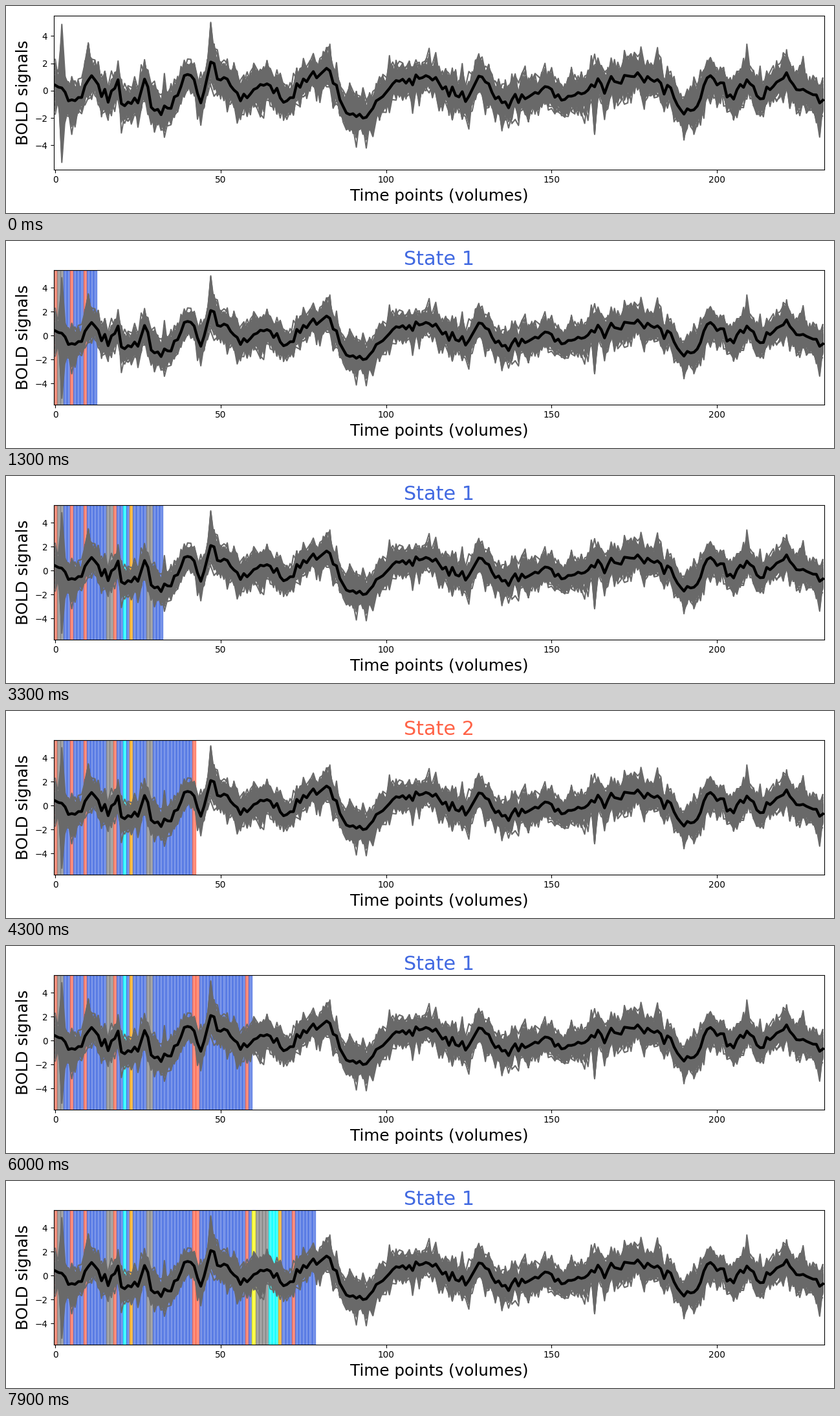
A matplotlib script for the animation above (8000 ms loop, 1280 by 320 pixels).

```python
import numpy as np
import matplotlib.pyplot as plt
from matplotlib.animation import FuncAnimation
from matplotlib.collections import LineCollection

W, H, DPI = 1280, 320, 100
POINTS, REGIONS, STEPS = 233, 150, 80
LEFT, RIGHT, BOTTOM = 74, 1265, 252.5
TOP_PLAIN, TOP_TITLED = 14.5, 44.5

plt.rcParams["font.family"] = "DejaVu Sans"
rng = np.random.default_rng(4)
t = np.arange(POINTS)

# Main swings of the mean signal: (volume, value).
SWINGS = [
    (0, .4), (2, .2), (4, -.75), (7, -.5), (11, 1.1), (16, -.85), (19, .8),
    (20, -.95), (25, -.9), (27, .85), (30, -1.45), (35, -1.3), (39, 1.1),
    (42, .8), (44, -.9), (47, 2.1), (49, .85), (52, .85), (56, -.75),
    (64, .5), (70, -.75), (78, 1.4), (83, 1.45), (87, -1.15), (94, -1.95),
    (102, .5), (113, 1), (124, -.8), (129, 1), (133, -.6), (142, -.6),
    (148, .3), (153, -.7), (165, .5), (177, 1), (185, .4), (189, -1.4),
    (193, -1.4), (198, 1.1), (204, -.3), (209, .8), (213, -.6), (220, .9),
    (232, -.7),
]
PEAKS = {2: 4.85, 10: 3.5, 47: 5, 83: 3.4, 113: 3.1, 177: 3.2, 209: 3.4}
DIPS = {2: -5.25, 5: -3.2, 20: -3.1, 94: -4.2, 163: -3.2, 193: -3.2, 231: -3.4}

COLORS = {1: "royalblue", 2: "tomato", 3: "gray", 4: "orange", 5: "cyan", 6: "yellow"}
# Volumes spent outside state 1.
VISITS = {
    2: [0, 5, 9, 18, 42, 43, 58, 72],
    3: [1, 2, 16, 17, 28, 29, *range(61, 65)],
    4: [23, 68],
    5: [21, *range(65, 68)],
    6: [60],
}
states = np.ones(STEPS - 1, int)
for state, volumes in VISITS.items():
    states[volumes] = state


def limit(side, extremes):
    """Spiky envelope on one side of the mean."""
    reach = 1.1 + np.minimum(rng.gamma(1.2, .35, POINTS), 1.3)
    edge = mean + side * reach
    edge[list(extremes)] = list(extremes.values())
    return edge


corners, values = zip(*SWINGS)
jitter = rng.normal(0, .25, POINTS)
jitter[list(corners)] = 0
mean = np.interp(t, corners, values) + jitter
upper, lower = limit(1, PEAKS), limit(-1, DIPS)

# Correlated noise around the mean, scaled to touch both limits.
noise = rng.normal(size=(REGIONS, POINTS + 1))
noise = noise[:, 1:] + .5 * noise[:, :-1]
above = noise / noise.max(axis=0) * (upper - mean)
below = noise / -noise.min(axis=0) * (mean - lower)
signals = mean + np.where(noise > 0, above, below)

fig = plt.figure(figsize=(W / DPI, H / DPI), dpi=DPI, facecolor="white")
ax = fig.add_axes([0, 0, 1, 1])
bands = [ax.axvspan(i - .5, i + .5, color=COLORS[s], alpha=.7)
         for i, s in enumerate(states)]
ax.add_collection(LineCollection([np.column_stack([t, s]) for s in signals],
                                 colors="dimgray", linewidths=1.5, zorder=2))
ax.plot(t, mean, color="black", lw=3, zorder=3)
ax.set_xlim(-.4, 232.4)
ax.set_ylim(-5.76, 5.51)
ax.set_xticks(range(0, 201, 50))
ax.set_yticks(range(-4, 5, 2))
ax.tick_params(labelsize=9.85)
ax.set_xlabel("Time points (volumes)", fontsize=17.75)
ax.set_ylabel("BOLD signals", fontsize=17.75)
title = ax.set_title("", fontsize=21.75, pad=5.5)


def draw(step):
    top = TOP_TITLED if step else TOP_PLAIN
    ax.set_position([LEFT / W, 1 - BOTTOM / H, (RIGHT - LEFT) / W, (BOTTOM - top) / H])
    for i, band in enumerate(bands):
        band.set_visible(i < step)
    if step:
        state = states[step - 1]
        title.set_text(f"State {state}")
        title.set_color(COLORS[state])
    else:
        title.set_text("")
    return [*bands, title]


anim = FuncAnimation(fig, draw, frames=STEPS, interval=100, repeat=True, repeat_delay=0)
plt.show()
```
